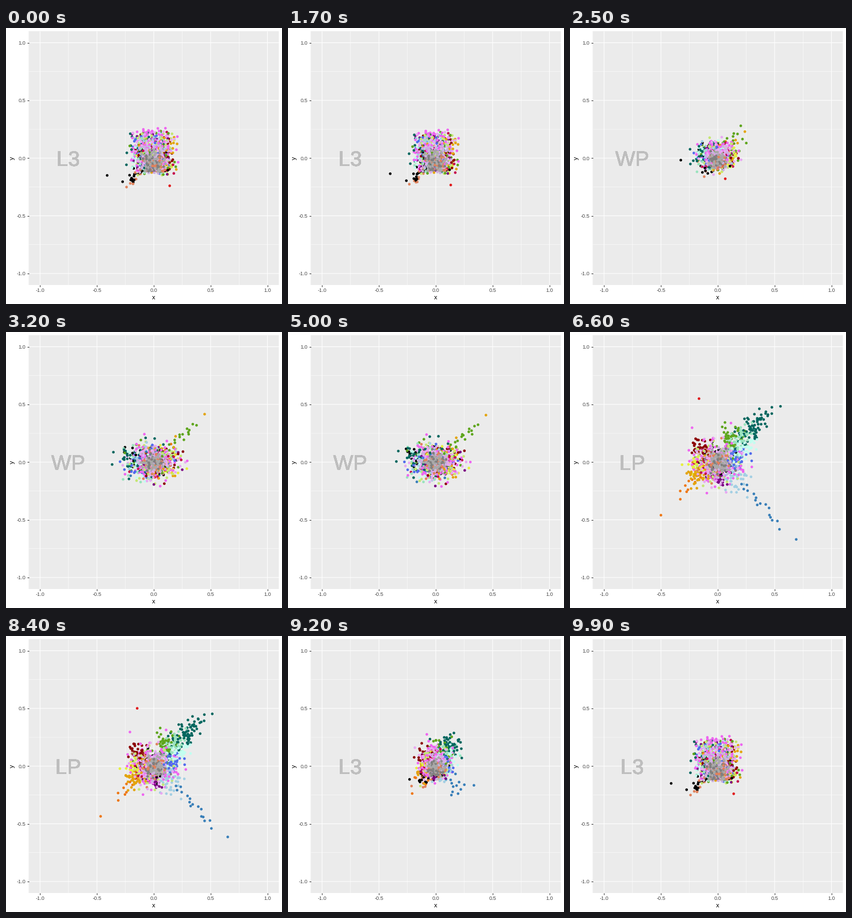
Recreate the animation shown at these times as a matplotlib script. Size 480 by 480 pixels, loop 10 s.

```python
import numpy as np
import matplotlib.pyplot as plt
from matplotlib.animation import FuncAnimation
from matplotlib.patheffects import Normal

plt.rcParams["font.family"] = "Liberation Sans"
rng = np.random.default_rng(11)

SIZE = 480
FRAMES = 100
LEFT, RIGHT, TOP, BOTTOM = 39.5, 474.5, 5.5, 447
LIM = 1.1
STATES = ["L3", "WP", "LP"]
L3, WP, LP = range(3)
MOVES = [(16, 33), (49, 66), (83, 99)]

BLACK, TEAL, GREEN, ORANGE = "black", "#01665e", "#5ea51c", "#ee7714"
STEEL, SALMON, GOLD, RED = "#377eb8", "#e0825c", "#e3a40c", "#e01a1c"

# groups that fan out in LP: angle in degrees and reach
RAYS = {
    "#7b0082": (275, .10), "#8b0000": (140, .17), "#c40a4c": (190, .10),
    TEAL: (45, .42), GREEN: (60, .22), "#99e3bd": (44, .26),
    "#c2fff0": (25, .23), "#e6f03c": (185, .16), GOLD: (212, .20),
    "#4f6bec": (10, .17), "#a3cfe3": (-45, .19)}

# groups that stay in the middle: spread, from back to front
CORE = {
    BLACK: .06, "#c5e673": .085, "#ee66f0": .1, "#e8a9f2": .09,
    "#ccb0e0": .065, SALMON: .045, "#808080": .045, "#a9a9a9": .05}

# lines of points: colour, count, state, start, end
STREAKS = [
    (STEEL, 16, LP, (.2, -.18), (.55, -.54)),
    (ORANGE, 12, LP, (-.15, -.1), (-.32, -.28)),
    (GREEN, 20, WP, (.1, .06), (.36, .34)),
    (BLACK, 14, WP, (-.12, -.03), (-.26, .1)),
    (BLACK, 22, L3, (-.08, -.08), (-.22, -.2)),
    (SALMON, 14, L3, (-.08, -.08), (-.23, -.22))]

# single far points in L3, WP and LP
FAR = [
    (BLACK, (-.41, -.15), (-.25, .1), (0, -.07)),
    (GOLD, (-.03, -.01), (.477, .442), (-.13, -.15)),
    (RED, (.14, -.24), (0, -.125), (-.165, .55)),
    (STEEL, (.06, .225), (-.22, -.14), (.69, -.67)),
    (ORANGE, (.02, -.065), (.16, .17), (-.5, -.46))]


def place(n, lp=(0, 0), spread=.085, stretch=0, lp_sd=None):
    """Positions of n points in L3, WP and LP, shape (3, n, 2)."""
    x, y = lp
    noise = rng.normal(size=(3, n, 2))
    lift = 2 * (spread - .065)              # tight groups sit lower in L3
    boxy = (-.2 * x, lift) + 2.4 * spread * np.tanh(.5 * noise[L3])
    oval = (-.4 * x, 0) + noise[WP] * spread * (1.1, .8)
    fan = np.outer(rng.normal(1, stretch, n), lp) + noise[LP] * (lp_sd or spread)
    return np.stack([boxy, oval, fan])


def build():
    parts, colors, ranks = [], [], []

    def add(color, pts, rank=0):
        n = pts.shape[1]
        parts.append(pts)
        colors.extend([color] * n)
        ranks.extend(rank + rng.normal(0, 1.5, n))

    for color, *path in FAR:
        add(color, np.reshape(path, (3, 1, 2)))
    for color, n, state, start, end in STREAKS:
        pts = place(n)
        pts[state] = np.linspace(start, end, n) + rng.normal(0, .022, (n, 2))
        add(color, pts)
    for color, (angle, reach) in RAYS.items():
        a = np.radians(angle)
        lp = reach * np.cos(a), reach * np.sin(a)
        add(color, place(30 + int(110 * reach), lp, stretch=.25, lp_sd=.045), 1)
    for i, (color, spread) in enumerate(CORE.items()):
        add(color, place(int(1200 * spread), spread=spread), i)
    order = np.argsort(ranks)
    return np.concatenate(parts, axis=1)[:, order], [colors[i] for i in order]


def phase(frame):
    """Current state and progress towards the next one."""
    for i, (start, end) in enumerate(MOVES):
        if frame < end:
            return i, max(0, frame - start) / (end - start)
    return 0, 0


fig = plt.figure(figsize=(SIZE / 72, SIZE / 72), dpi=72, facecolor="white")
ax = fig.add_axes([LEFT / SIZE, 1 - BOTTOM / SIZE,
                   (RIGHT - LEFT) / SIZE, (BOTTOM - TOP) / SIZE],
                  facecolor="#ebebeb")
ax.set(xlim=(-LIM, LIM), ylim=(-LIM, LIM))
ax.spines[:].set_visible(False)
ax.patch.set_snap(False)
ax.set_axisbelow(True)

major = np.arange(-1, 1.1, .5)
for axis in (ax.xaxis, ax.yaxis):
    axis.set_ticks(major, labels=[f"{v:.1f}" for v in major])
    axis.set_ticks(major[:-1] + .25, minor=True)
    for which, width in (("major", 1.07), ("minor", .53)):
        axis.grid(True, which=which, color="white", lw=width, snap=False)
ax.tick_params(length=2.74, width=1.07, pad=2.2, color="#333333",
               labelcolor="#4d4d4d", labelsize=9.1)
ax.tick_params(which="minor", length=0)

fig.text(256.5 / SIZE, 1 - 471.5 / SIZE, "x", size=11, ha="center", va="baseline")
fig.text(11 / SIZE, 1 - 226 / SIZE, "y", size=11, rotation=90,
         ha="center", va="center")

points, colors = build()
dots = ax.scatter(*points[0].T, s=4.6 ** 2, c=colors, linewidths=0, zorder=3)
# stacked copies harden the edges of the big label
label = fig.text(108.2 / SIZE, 1 - 239.8 / SIZE, "", size=36.5, color="#bebebe",
                 ha="center", va="baseline", path_effects=[Normal()] * 24)


def update(frame):
    i, t = phase(frame)
    j = (i + 1) % len(STATES)
    dots.set_offsets(points[i] * (1 - t) + points[j] * t)
    label.set_text(STATES[j if t > .5 else i])
    return dots, label


anim = FuncAnimation(fig, update, frames=FRAMES, interval=100,
                     repeat=True, repeat_delay=0, blit=False)
plt.show()
```
